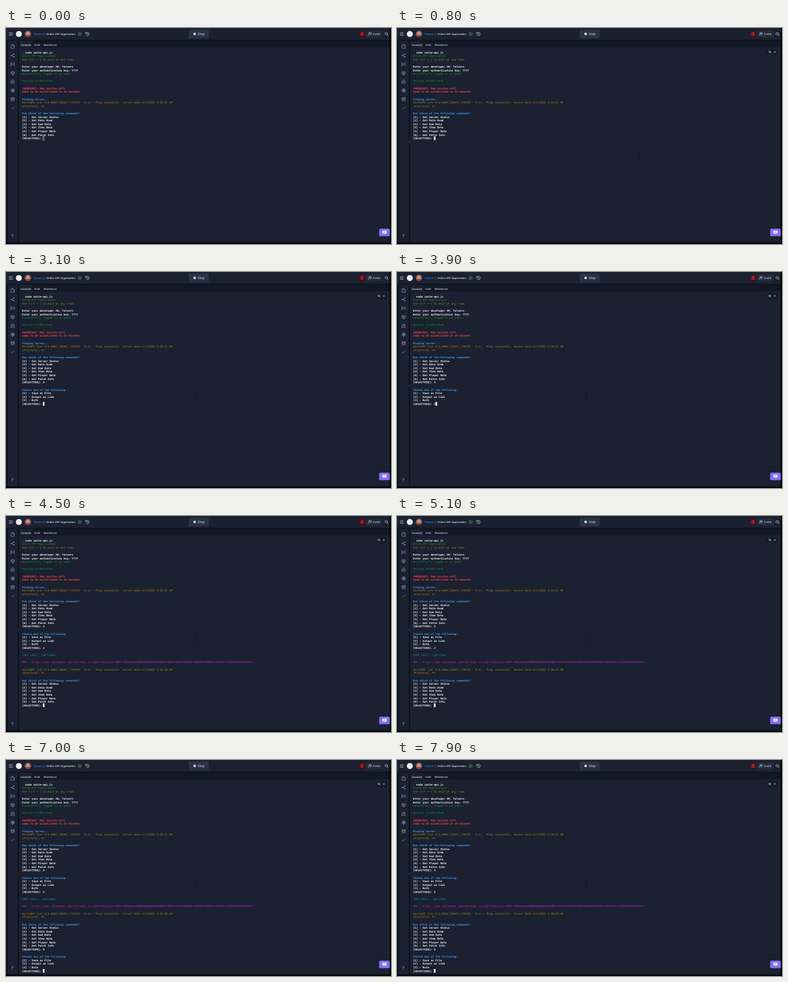
These frames come from a looping animation (600x338 px, 8 s). An HTML page:

```html
<!DOCTYPE html>
<html lang="en">
<head>
<meta charset="utf-8">
<title>Console session</title>
<style>
  html, body { margin: 0; width: 100%; height: 100%; overflow: hidden; background: #1b2131; }
  svg { display: block; width: 100vw; height: 100vh; }
  text { font-family: Inter, sans-serif; text-rendering: geometricPrecision; white-space: pre; fill: #e4e7ee; }
  #term text { font: 4.153px "DejaVu Sans Mono", monospace; }
  #term .white, #term .blue, #term .red { font-weight: 700; }
  #term .white { fill: #f1f3f6; }
  #term .blue { fill: #3798f2; }
  #term .red { fill: #ee464e; }
  #term .green { fill: #08a025; }
  #term .gold { fill: #b3840d; }
  #term .cyan { fill: #1592b2; }
  #term .pink { fill: #d022d2; }
  #term .orange { fill: #b5622c; }
  .icon { fill: none; stroke: #a3abba; stroke-width: .6; stroke-linecap: round; stroke-linejoin: round; }
  .bright { stroke: #dfe3ea; }
</style>
</head>
<body>
<svg viewBox="0 0 600 338" preserveAspectRatio="none">
  <rect width="600" height="338" fill="#1b2131"/>

  <!-- tab bar and panel gaps -->
  <rect x="20" y="19" width="578.4" height="11.6" fill="#121826"/>
  <rect x="20.2" y="20" width="20.6" height="11" fill="#1b2131"/>
  <g fill="#0c111d">
    <rect y="18.6" width="600" height="1.2"/>
    <rect y="19" width="2.6" height="319"/>
    <rect x="18.6" y="19" width="1.6" height="319"/>
    <rect x="597.8" y="19" width="2.2" height="319"/>
    <rect y="335.6" width="600" height="2.4"/>
  </g>
  <path d="M599 0v337H0" fill="none" stroke="#000" stroke-width="2"/>
  <rect x="18.9" y="176.5" width="1" height="3.5" fill="#39435a"/>

  <!-- header -->
  <path class="icon bright" d="M5 7.3h5M5 9.4h5M5 11.5h5"/>
  <circle cx="20" cy="9.4" r="4.7" fill="#eef0f4"/>
  <clipPath id="face"><circle cx="34.2" cy="9.2" r="4.9"/></clipPath>
  <g clip-path="url(#face)">
    <rect x="29" y="4" width="11" height="11" fill="#8c6a62"/>
    <path d="M29 15q0-4 5.2-4t5.2 4z" fill="#a33a35"/>
    <circle cx="34.2" cy="8.6" r="2.5" fill="#c99a84"/>
  </g>
  <g font-size="4.2" font-weight="500">
    <text x="42.8" y="11" style="fill:#1c86e6">Talvern</text>
    <text x="59.2" y="11" style="fill:#9aa3b3">/</text>
    <text x="63" y="11">Grelm-API-Application</text>
  </g>
  <circle cx="114.9" cy="9.4" r="3.3" fill="#2b5236"/>
  <path class="icon bright" d="M124.5 8.2a2.7 2.7 0 1 1 .2 2.6M124 6.6v2h2M127 7.8v1.8l1.2.8"/>

  <rect x="285" y="2.4" width="31" height="13.8" rx="1.8" fill="#2b3245"/>
  <rect x="292.2" y="7.6" width="3.5" height="3.5" rx=".4" fill="#d9dde6"/>
  <text x="299" y="11.2" font-size="4.9">Stop</text>

  <rect x="550.8" y="5" width="8.4" height="9" rx="1.6" fill="#560c15"/>
  <path class="icon" style="stroke:#f0444c" d="M553.4 7.8h3.2v3.6h-3.2zM554.1 7.6v-.8h1.8v.8M554.4 9.5h1.2"/>
  <rect x="561" y="4" width="26" height="11" rx="1.6" fill="#222a3b"/>
  <g class="icon bright">
    <path d="M564.5 11.4q0-1.8 1.9-1.8t1.9 1.8M568.2 8.4h1.6M569 7.6v1.6"/>
    <circle cx="566.4" cy="7.9" r=".9"/>
  </g>
  <text x="572" y="11" font-size="4.4">Invite</text>
  <g class="icon bright"><circle cx="592.6" cy="8.9" r="1.9"/><path d="M594 10.3l1.5 1.5"/></g>

  <!-- tabs -->
  <g font-size="4.1">
    <text x="23" y="27.9" font-weight="500">Console</text>
    <text x="43.8" y="27.9">Shell</text>
    <text x="58.8" y="27.9">Markdown</text>
  </g>

  <!-- sidebar -->
  <g class="icon">
    <path d="M8.4 26.2h2.8l1.6 1.6v4H8.4zM11 26.2v1.8h1.8"/>
    <path d="M8.2 43l3.8-2M8.2 43l3.8 2"/>
    <circle cx="8.3" cy="43" r=".4"/><circle cx="12.1" cy="41" r=".5"/><circle cx="12.1" cy="45" r=".5"/>
    <path d="M8 54.2l3.4 2.3L8 58.8zM12.8 54.2v4.6"/>
    <path d="M10.4 67.8l2.5 1.3v2.8l-2.5 1.3-2.5-1.3v-2.8zM7.9 69.1l2.5 1.3 2.5-1.3M10.4 70.4v2.8"/>
    <path d="M8.2 83.7h4.4v3H8.2zM9 83.5v-1a1.4 1.4 0 0 1 2.8 0v1"/>
    <circle cx="10.4" cy="97.8" r="2.3"/><circle cx="10.4" cy="97.8" r=".8"/>
    <path d="M10.4 94.9v.6M10.4 100.1v.6M7.5 97.8h.6M12.7 97.8h.6M8.4 95.8l.4.4M12 99.4l.4.4M12.4 95.8l-.4.4M8.8 99.4l-.4.4"/>
    <ellipse cx="10.4" cy="109.6" rx="2.3" ry=".9"/>
    <path d="M8.1 109.6v3.9q2.3 1.6 4.6 0v-3.9M8.1 111.6q2.3 1.6 4.6 0"/>
    <path d="M8.2 125.2l1.5 1.5 3-3.2"/>
  </g>
  <text x="8" y="328.4" font-size="7" style="fill:#b5bcca">?</text>

  <!-- chat button -->
  <rect x="581.6" y="314" width="16.4" height="11.8" rx="1.6" fill="#876cf8"/>
  <path d="M586.6 317h6.4v4.6h-2.2l-1 1.2-1-1.2h-2.2z" fill="#f1eeff"/>
  <path d="M588 318.6h3.6M588 320.1h3.6" stroke="#876cf8" stroke-width=".5"/>

  <g id="tools">
    <rect x="577.4" y="33.6" width="15" height="8" rx="1" fill="#121826"/>
    <g class="icon bright">
      <circle cx="580.8" cy="37.2" r="1.4"/><path d="M581.9 38.3l1.1 1.1M587.5 36.3l2.4 2.4M589.9 36.3l-2.4 2.4"/>
    </g>
  </g>

  <g id="term"></g>
  <rect id="cursor"/>
  <path id="mouse" d="M-1.2-2.8H1.2M0-2.8V2.8M-1.2 2.8H1.2" fill="none" stroke="#0b0f19" stroke-width=".6"/>
</svg>

<script>
const LOOP = 8000, LEFT = 25, TOP = 38, COL = 2.5, ROW = 5.617;
const byId = id => document.getElementById(id);
const term = byId('term'), cursor = byId('cursor'), mouse = byId('mouse'), tools = byId('tools');
const timed = [];

function print(row, color, text, at = 0, col = 0) {
  const el = document.createElementNS('http://www.w3.org/2000/svg', 'text');
  el.setAttribute('x', LEFT + col * COL);
  el.setAttribute('y', TOP + row * ROW + 1.5);
  el.setAttribute('class', color);
  el.textContent = text;
  term.append(el);
  timed.push({ el, at });
}

function menu(row, title, items, at) {
  print(row, 'blue', title, at);
  items.forEach((item, i) => print(row + 1 + i, 'white', `[${i + 1}] - ${item}`, at));
  print(row + 1 + items.length, 'white', '[SELECTION]:', at);
}
const commands = (row, at) => menu(row, 'Run which of the following commands?',
  ['Get Server Status', 'Get Data Used', 'Get God Data', 'Get Item Data', 'Get Player Data', 'Get Patch Info'], at);
const outputs = (row, at) => menu(row, 'Choose one of the following:',
  ['Save as File', 'Output as Link', 'Both'], at);
const answer = (row, key, at) => print(row, 'white', key, at, 13);

function ping(row, clock, at) {
  print(row, 'gold', `SmiteAPI [ver 9.0.8063.14581] [PATCH - 9.2] - Ping successful. Server Date:3/3/2022 ${clock} AM`, at);
  print(row + 1, 'gold', '[Platform]: PC', at);
}

print(0, 'orange', '›');
print(0, 'white', 'node smite-api.js', 0, 2);
print(1, 'green', 'Grelm API Application');
print(2, 'gold', 'Use ctrl + c to exit at any time.');
print(4, 'white', 'Enter your developer ID: Talvern');
print(5, 'white', 'Enter your authentication key: 7777');
print(6, 'green', 'Successfully logged in as owner.');
print(8, 'green', 'Session established');
print(10, 'red', '[WARNING]: New session will');
print(11, 'red', 'need to be established in 15 minutes.');
print(13, 'blue', 'Pinging server..');
ping(14, '3:18:31');
commands(17);
answer(24, '4', 2400);
outputs(26, 2800);
answer(30, '2', 3600);
print(32, 'cyan', '[API CALL]: /getitems', 4200);
print(34, 'pink', 'URL - https://api.smitegame.com/smiteapi.svc/getitemsjson/4007/285a5a8ce98964408626b62a852f58f0/65A2F91050C34683FF9E9E21222A2FF3/20220303033030/1', 4400);
ping(36, '3:30:30', 4400);
commands(39, 4400);
answer(46, '6', 6500);
outputs(48, 6900);

// [time, row, column]
const cursorStops = [[0, 24, 13], [2400, 24, 14], [2800, 30, 13], [3600, 30, 14],
  [4200, 33, 0], [4400, 46, 13], [6500, 46, 14], [6900, 52, 13]];
// [time, x, y]
const mouseStops = [[100, 590, 12], [500, 377, 199], [800, 377, 199], [1000, 295, 193], [LOOP, 295, 193]];
const FOCUS = 500, HOVER = 200;

const show = (el, on) => el.setAttribute('visibility', on ? 'visible' : 'hidden');

function mouseAt(t) {
  const i = Math.max(1, mouseStops.findIndex(s => s[0] > t));
  const [t0, x0, y0] = mouseStops[i - 1], [t1, x1, y1] = mouseStops[i];
  const p = Math.max(0, (t - t0) / (t1 - t0)), k = p * p * (3 - 2 * p);
  return [x0 + (x1 - x0) * k, y0 + (y1 - y0) * k];
}

function draw(now) {
  const t = now % LOOP;
  timed.forEach(({ el, at }) => show(el, t >= at));

  const [, row, col] = cursorStops.filter(s => s[0] <= t).pop();
  const focused = t >= FOCUS, inset = focused ? 0 : .25;
  cursor.setAttribute('x', LEFT + col * COL + inset);
  cursor.setAttribute('y', TOP + row * ROW - 3.1 + inset);
  cursor.setAttribute('width', COL - 2 * inset);
  cursor.setAttribute('height', 5.8 - 2 * inset);
  cursor.setAttribute('fill', focused ? '#f1f3f6' : 'none');
  cursor.setAttribute('stroke', focused ? 'none' : '#f1f3f6');
  cursor.setAttribute('stroke-width', .5);

  show(tools, t >= HOVER);
  show(mouse, t >= 100);
  mouse.setAttribute('transform', `translate(${mouseAt(t)})`);
}

const start = performance.now();
function tick() {
  draw(performance.now() - start);
  requestAnimationFrame(tick);
}
tick();
</script>
</body>
</html>
```
